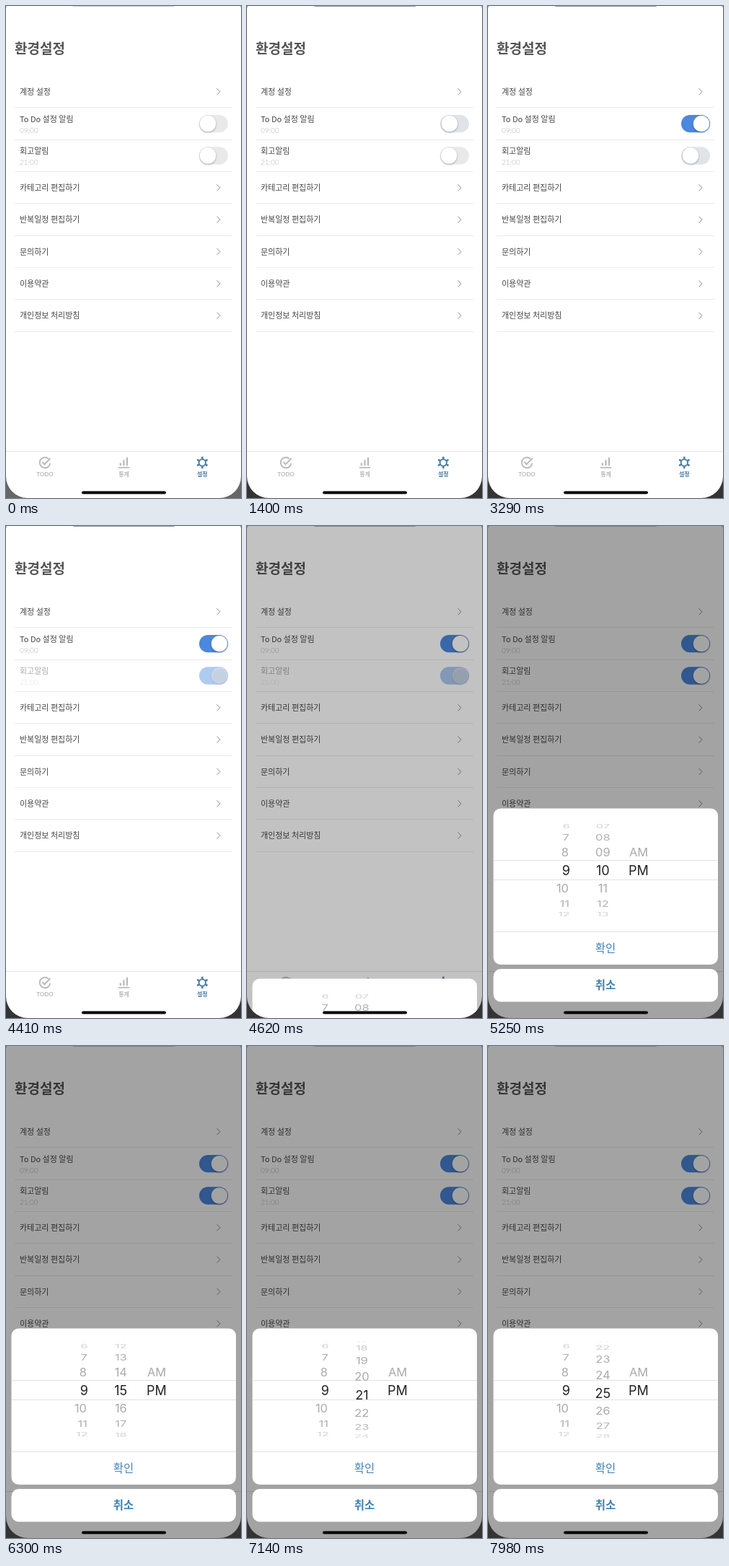
These frames come from a looping animation (326 px wide and 682 px high, 8000 ms). An HTML page with a canvas:

```html
<!DOCTYPE html>
<html lang="ko">
<head>
<meta charset="utf-8">
<title>환경설정</title>
<style>
html, body { margin: 0; width: 100%; height: 100%; overflow: hidden; background: #fff; }
canvas { display: block; width: 326px; height: 682px; }
</style>
</head>
<body>
<canvas id="stage"></canvas>
<script>
const W = 326, H = 682, LOOP = 8000, STEP = 70;
const KR = '"Noto Sans CJK KR", "Noto Sans CJK", sans-serif';
const LATO = 'Lato, sans-serif';
const INTER = 'Inter, sans-serif';
const GRAY = '#b9b9b9', BLUE = '#4a7da6', LINK = '#3f83b8';

const canvas = document.getElementById('stage');
const dpr = window.devicePixelRatio || 1;
canvas.width = W * dpr;
canvas.height = H * dpr;
const c = canvas.getContext('2d');

const smooth = u => {
  u = Math.min(1, Math.max(0, u));
  return u * u * (3 - 2 * u);
};
// Eased 0..1 whose first visible step is at a and which is complete at b.
const ramp = (t, a, b) => smooth((t - a + STEP) / (b - a + STEP));
const mix = (a, b, u) => `rgb(${a.map((v, i) => Math.round(v + (b[i] - v) * u))})`;

// y is the vertical middle of the glyphs
function text(s, x, y, size, family, color, weight = 400, align = 'left') {
  c.font = `${weight} ${size}px ${family}`;
  c.fillStyle = color;
  c.textAlign = align;
  c.fillText(s, x, y + size * 0.37);
}

function rect(x, y, w, h, color) {
  c.fillStyle = color;
  c.fillRect(x, y, w, h);
}

function round(x, y, w, h, r, color) {
  c.beginPath();
  c.roundRect(x, y, w, h, r);
  c.fillStyle = color;
  c.fill();
}

function disc(x, y, r, color) {
  c.beginPath();
  c.arc(x, y, r, 0, 7);
  c.fillStyle = color;
  c.fill();
}

function path(points, color, width) {
  c.beginPath();
  points.forEach(([x, y]) => c.lineTo(x, y));
  c.strokeStyle = color;
  c.lineWidth = width;
  c.stroke();
}

function ring(x, y, r, color, width, a = 0, b = Math.PI * 2) {
  c.beginPath();
  c.arc(x, y, r, a, b);
  c.strokeStyle = color;
  c.lineWidth = width;
  c.stroke();
}

function toggle(y, on) {
  round(268, y - 12.2, 40, 24.4, 12.2, mix([233, 233, 234], [75, 136, 222], on));
  c.save();
  c.shadowColor = 'rgba(0,0,0,.32)';
  c.shadowBlur = 2.5 * dpr;
  c.shadowOffsetY = 1 * dpr;
  disc(280 + 16 * on, y, 11.2, '#fff');
  c.restore();
}

function alarmRow(y, title, time, on, alpha) {
  c.globalAlpha = alpha;
  text(title, 19, y - 6.6, 11, KR, '#444');
  text(time, 19, y + 8.8, 10, LATO, '#b4b4b4', 300);
  toggle(y, on);
  c.globalAlpha = 1;
}

function linkRow(y, title) {
  text(title, 19, y, 11, KR, '#444');
  path([[292.5, y - 4.5], [297, y], [292.5, y + 4.5]], '#8c8c8c', 1);
}

function tabs() {
  rect(0, 617, W, 1, '#e3e3e3');

  ring(54, 633, 7.3, GRAY, 1.9, 0.1, 5.45);
  path([[50.5, 632], [53.5, 635.3], [61.5, 627]], GRAY, 1.9);
  text('TODO', 54, 649, 8, LATO, GRAY, 700, 'center');

  rect(155.7, 639, 15.5, 1.7, GRAY);
  [4, 8, 11.5].forEach((h, i) => rect(157.7 + i * 4.6, 637.3 - h, 2.2, h, GRAY));
  text('통계', 163.5, 649, 8, KR, GRAY, 700, 'center');

  ring(272.3, 633, 4.7, BLUE, 2);
  for (let i = 0; i < 6; i++) {
    const a = Math.PI / 6 + i * Math.PI / 3, x = Math.cos(a), y = Math.sin(a);
    path([[272.3 + 4.5 * x, 633 + 4.5 * y], [272.3 + 7 * x, 633 + 7 * y]], BLUE, 1.8);
    disc(272.3 + 7 * x, 633 + 7 * y, 1.4, BLUE);
  }
  text('설정', 272.3, 649, 8, KR, BLUE, 700, 'center');
}

function page(t) {
  rect(0, 0, W, H, '#fff');
  text('환경설정', 12, 58.5, 19, KR, '#555', 700);

  const rowY = i => 118.8 + i * 44.35;
  for (let i = 0; i < 8; i++) rect(12, Math.round(rowY(i) + 21.5), 302, 1, '#ebebeb');
  linkRow(rowY(0), '계정 설정');
  alarmRow(rowY(1), 'To Do 설정 알림', '09:00', ramp(t, 1400, 1820), 1);
  const press = t < 4410 ? 0 : 0.56 * (1 - smooth((t - 4600) / 190));
  alarmRow(rowY(2), '회고알림', '21:00', ramp(t, 3290, 3710), 1 - press);
  ['카테고리 편집하기', '반복일정 편집하기', '문의하기', '이용약관', '개인정보 처리방침']
    .forEach((s, i) => linkRow(rowY(i + 3), s));
  tabs();
}

// One wheel column, rolled on a cylinder around mid.
function wheel(mid, pos, label, place) {
  const base = Math.round(pos);
  for (let k = -4; k <= 4; k++) {
    const d = base + k - pos, a = d * 0.375, squash = Math.cos(a);
    const s = label(base + k);
    if (squash < 0.05 || !s) continue;
    const picked = Math.abs(d) < 0.5;
    const [x, align] = place(picked, Math.abs(d));
    c.save();
    c.translate(x, mid + 68 * Math.sin(a));
    c.scale(1, squash);
    c.globalAlpha = Math.min(1, squash * 1.25);
    text(s, 0, 0, picked ? 18 : 16.4, INTER, picked ? '#222' : '#a9a9a9', 400, align);
    c.restore();
  }
}

function minutes(t) {
  return 10 + 8 * ramp(t, 5880, 6650) + 7 * ramp(t, 7000, 7420)
    - 0.05 * ramp(t, 7630, 7700) - 0.1 * ramp(t, 7910, 7980);
}

function sheet(t) {
  const lag = Math.exp(-(t - 4620) / 60);
  rect(0, 0, W, H, `rgba(0,0,0,${0.36 - 0.12 * lag})`);
  c.save();
  c.translate(0, lag < 0.008 ? 0 : 236 * lag);
  round(7.5, 391.5, 311.5, 216.5, 10, '#fff');
  [463, 490, 562].forEach(y => rect(7.5, y, 311.5, 1, '#e2e2e2'));
  const mid = 477.5;
  wheel(mid, 9, n => String((n + 11) % 12 + 1),
    (picked, d) => [picked ? 114 : 111 + d * 0.9, 'right']);
  wheel(mid, minutes(t), n => String(n % 60).padStart(2, '0'),
    () => [159.3, 'center']);
  wheel(mid, 1, n => ['AM', 'PM'][n],
    picked => [picked ? 195 : 196, 'left']);
  text('확인', 163, 585, 15.4, KR, LINK, 400, 'center');
  round(7.5, 614, 311.5, 45.5, 10, '#fff');
  text('취소', 163, 636.5, 15.4, KR, LINK, 700, 'center');
  c.restore();
}

function bezel(t) {
  round(105, 672.4, 117, 4.2, 2.1, '#000');
  const early = t < 1400;
  round(91, -8, 145, 8.8, 4, early ? '#bbb' : '#777');
  c.beginPath();
  c.rect(0, 0, W, H);
  c.roundRect(0, -8, W, H + 8, [12, 12, 30, 30]);
  c.fillStyle = early ? '#666' : '#343434';
  c.fill('evenodd');
}

function draw(now) {
  const t = Math.floor(now % LOOP / STEP) * STEP;
  c.setTransform(dpr, 0, 0, dpr, 0, 0);
  page(t);
  if (t >= 4620) sheet(t);
  bezel(t);
}

let start;
function tick(now) {
  start ??= now;
  draw(now - start);
  requestAnimationFrame(tick);
}
draw(0);
requestAnimationFrame(tick);
</script>
</body>
</html>
```
